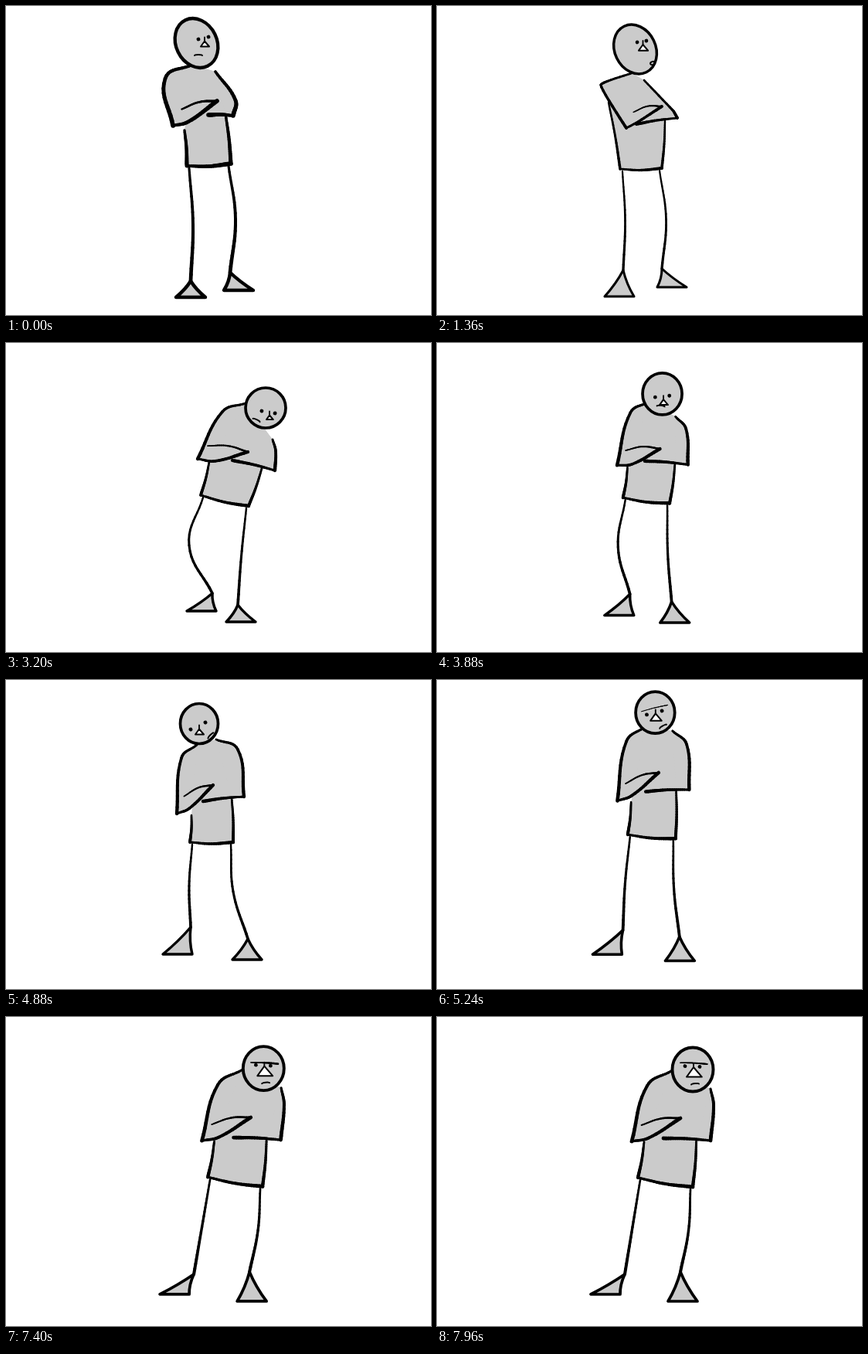
Animation, 550 px wide and 400 px high, one loop 8 s. Source, as an HTML page with a canvas:

```html
<!DOCTYPE html>
<html lang="en">
<head>
<meta charset="utf-8">
<title>Waiting figure</title>
<style>
  html, body { margin: 0; width: 100%; height: 100%; overflow: hidden; background: #fff; }
  canvas { display: block; }
</style>
</head>
<body>
<canvas id="stage" width="550" height="400"></canvas>
<script>
const ctx = document.getElementById('stage').getContext('2d');
const LOOP = 8000, GREY = '#cbcbcb', INK = '#000', SHOE = 38;

// A pose is a handful of joints (x, y pairs) plus these settings:
// skull: radii, tilt   look: tilt, eye distance, nose size, lid   lips: turn, openness
// shoe: slant, height, knee bend   pen: line weight, softness of corners
const SETTINGS = new Set(['skull', 'look', 'lips', 'shoeL', 'shoeR', 'pen']);

const folded = {
  head: [246.5, 48], skull: [26.5, 33, -.45], face: [255.5, 41.5], look: [-.23, 6.7, 1, 0],
  mouth: [249, 64], lips: [0, 0],
  armL: [241, 76, 206, 94, 216, 155, 273, 123], armR: [271, 85, 297, 122, 294, 142, 262, 141],
  waist: [231, 161], hips: [234, 207, 291, 204],
  ankleL: [239, 356], shoeL: [0, 21, 4], ankleR: [290, 345], shoeR: [11, 23, 8], pen: [5.2, 1]
};
const whistling = {
  head: [256.5, 56], skull: [26.5, 33, -.45], face: [265, 46], look: [-.16, 6, 1.1, 0],
  mouth: [279, 74], lips: [-.4, 1],
  armL: [252, 87, 212, 102, 245, 158, 291, 130], armR: [268, 96, 306, 136, 311, 145, 258, 153],
  waist: [222, 125], hips: [237, 211, 291, 210],
  ankleL: [241, 342], shoeL: [-5, 34, 3], ankleR: [291, 340], shoeR: [13, 24, 7], pen: [3.6, .2]
};
const sulking = {
  head: [308.5, 71], skull: [26.5, 30, 0], face: [306, 72], look: [.06, 8, 1.2, 0],
  mouth: [293, 87], lips: [1, 0],
  armL: [279, 77, 259, 88, 241, 156, 297, 144], armR: [326, 98, 330, 120, 328, 167, 268, 157],
  waist: [244, 158], hips: [237, 197, 301, 206],
  ankleL: [245, 335], shoeL: [-9, 22, -12], ankleR: [294, 330], shoeR: [12, 34, 5], pen: [4.3, 1]
};
const stooped = {
  head: [336, 84], skull: [26, 26, 0], face: [339.5, 89.5], look: [.17, 8.7, .8, 0],
  mouth: [324, 100], lips: [.45, 0],
  armL: [310, 78, 280, 89, 248, 150, 313, 141], armR: [345, 125, 349, 140, 348, 165, 293, 152],
  waist: [263, 154], hips: [252, 197, 314, 211],
  ankleL: [267, 324], shoeL: [-14, 23, -24], ankleR: [300, 339], shoeR: [4, 22, -1], pen: [4, 1]
};
const tilted = {
  head: [250, 56.5], skull: [24.5, 26, 0], face: [248.5, 59.5], look: [-.44, 10.5, 1, 0],
  mouth: [265, 72], lips: [-.8, 0],
  armL: [247, 84, 227, 101, 221, 173, 268, 136], armR: [272, 77, 300, 90, 308, 151, 255, 157],
  waist: [240, 175], hips: [238, 210, 294, 210],
  ankleL: [239, 320], shoeL: [-17, 35, -3], ankleR: [313, 335], shoeR: [-1, 27, -8], pen: [4, 1]
};
const stern = {
  head: [331, 68], skull: [26.5, 28.5, 0], face: [330.5, 64], look: [.05, 9.5, 1.8, 3],
  mouth: [334, 87], lips: [-.1, 0],
  armL: [303, 70, 272, 89, 252, 161, 315, 131], armR: [354, 93, 358, 115, 354, 160, 293, 157],
  waist: [268, 162], hips: [260, 208, 331, 220],
  ankleL: [243, 333], shoeL: [-25, 26, 0], ankleR: [315, 330], shoeR: [3, 38, 4], pen: [4.4, 1]
};
const staring = { ...stern, look: [.05, 9.5, 1.8, 2] };

const mapParts = (pose, change) => Object.fromEntries(
  Object.entries(pose).map(([name, part]) => [name, change(part, name)]));

const mix = (a, b, k) => mapParts(a, (part, name) => part.map((v, i) => v + (b[name][i] - v) * k));

// Shifts the figure by an amount that grows from the feet to the head.
const lean = (pose, dx, dy) => mapParts(pose, (part, name) =>
  SETTINGS.has(name) ? part : part.map((v, i) =>
    v + (i % 2 ? dy : dx) * Math.max(0, (345 - part[i | 1]) / 300)));

const tall = lean(mix(folded, whistling, .6), -2, -8);
const sinking = lean(mix(whistling, sulking, .5), -4, 5);
const stretched = { ...lean(stooped, 34, -10), ankleL: [212, 326], shoeL: [-14, 24, -12] };
const recovering = lean(stooped, -18, -4);
const upright = lean(mix(sulking, tilted, .6), 4, -4);
const backward = lean(tilted, -8, -10);
const raised = lean(mix(tilted, stern, .4), 0, -20);
const swayed = lean(staring, 5, -3);

const timeline = [[0, folded]];
function tween(from, to, start, end, steps) {
  for (let i = 0; i < steps; i++) {
    const time = start + (end - start) * i / Math.max(1, steps - 1);
    timeline.push([time, mix(from, to, (i + 1) / steps)]);
  }
}

tween(folded, tall, 800, 880, 2);
tween(tall, whistling, 1360, 1360, 1);
tween(whistling, sinking, 1400, 1640, 5);
tween(sinking, sulking, 2120, 2320, 3);
tween(sulking, stretched, 2440, 2640, 3);
tween(stretched, stooped, 3040, 3200, 3);
tween(stooped, recovering, 3320, 3320, 1);
tween(recovering, upright, 3640, 4000, 6);
tween(upright, tilted, 4640, 4880, 4);
tween(tilted, backward, 4920, 5000, 2);
tween(backward, raised, 5160, 5240, 2);
tween(raised, stern, 5600, 5800, 3);
tween(stern, swayed, 7320, 7560, 4);
tween(swayed, staring, 7640, 7960, 5);

const pairs = part => part.flatMap((v, i) => i % 2 ? [] : [[v, part[i + 1]]]);
const shift = ([x, y], dx, dy) => [x + dx, y + dy];
const between = (a, b, k) => [a[0] + (b[0] - a[0]) * k, a[1] + (b[1] - a[1]) * k];
const bow = (a, b, dx, dy, k = .5) => [a, shift(between(a, b, k), dx, dy), b];

// Samples a curve through the points; softness 0 gives straight lines.
function curve(p, soft = 1) {
  const last = p.length - 1, out = [p[0]];
  const direction = i => {
    const a = p[Math.max(0, i - 1)], b = p[Math.min(last, i + 1)];
    const size = Math.hypot(b[0] - a[0], b[1] - a[1]) || 1;
    return [(b[0] - a[0]) / size, (b[1] - a[1]) / size];
  };
  for (let i = 0; i < last; i++) {
    const a = p[i], b = p[i + 1], da = direction(i), db = direction(i + 1);
    const reach = soft * Math.hypot(b[0] - a[0], b[1] - a[1]) * .4;
    const c = shift(a, da[0] * reach, da[1] * reach), d = shift(b, -db[0] * reach, -db[1] * reach);
    for (let s = 1; s <= 10; s++) {
      const t = s / 10, middle = between(c, d, t);
      out.push(between(between(between(a, c, t), middle, t),
        between(middle, between(d, b, t), t), t));
    }
  }
  return out;
}

// Draws a line that swells towards its end, like a brush pen.
function brush(line, weight) {
  for (let i = 1; i < line.length; i++) {
    ctx.lineWidth = weight * (.7 + .4 * i / line.length);
    ctx.beginPath();
    ctx.moveTo(...line[i - 1]);
    ctx.lineTo(...line[i]);
    ctx.stroke();
  }
}

function area(list, color) {
  ctx.beginPath();
  list.forEach(p => ctx.lineTo(...p));
  ctx.closePath();
  ctx.fillStyle = color;
  ctx.fill();
}

function drawBody({ armL, armR, waist, hips, pen: [weight, soft] }) {
  const [neck, shoulder, elbow, hand] = pairs(armL);
  const [collar, outer, elbowR, cuff] = pairs(armR);
  const [hipL, hipR] = pairs(hips);
  const upperL = curve([neck, shoulder, elbow], soft);
  const upperR = curve([collar, outer, elbowR], soft);
  const foreL = curve(bow(elbow, hand, 0, 6 * soft, .35), soft);
  const foreR = curve(bow(elbowR, cuff, 0, -1));
  const fingers = shift(between(hand, elbow, .8), 0, -15);
  const sideL = curve(bow(waist, hipL, 1, 0));
  const hem = curve(bow(hipL, hipR, 0, 2));
  const sideR = curve(bow(between(elbowR, cuff, .3), hipR, 1, 0));

  area([...upperL, ...foreL, cuff, ...upperR.toReversed()], GREY);
  area([neck, ...sideL, ...hem, ...sideR.toReversed(), collar], GREY);
  for (const line of [upperL, foreL, upperR, foreR, hem]) brush(line, weight);
  for (const line of [sideL, sideR]) brush(line, weight * .9);
  brush(curve(bow(fingers, hand, 0, -4)), weight * .6);
}

function drawLeg(hip, ankle, [slant, height, bend], weight) {
  brush(curve(bow(shift(hip, 0, 3), ankle, bend, 0)), weight * .85);
  const left = shift(ankle, slant - SHOE / 2, height), right = shift(left, SHOE, 0);
  const inside = between(ankle, between(left, right, .5), .55);
  const waistOf = corner => between(between(ankle, corner, .5), inside, .3);
  ctx.beginPath();
  ctx.moveTo(...ankle);
  ctx.quadraticCurveTo(...waistOf(left), ...left);
  ctx.lineTo(...right);
  ctx.quadraticCurveTo(...waistOf(right), ...ankle);
  ctx.fillStyle = GREY;
  ctx.fill();
  ctx.lineWidth = weight * .85;
  ctx.stroke();
}

function drawHead({ head, skull, face, look: [tilt, gap, nose, lid], mouth, lips: [turn, open], pen }) {
  ctx.beginPath();
  ctx.ellipse(...head, ...skull, 0, Math.PI * 2);
  ctx.fillStyle = GREY;
  ctx.fill();
  ctx.lineWidth = pen[0] * .5 + 1.7;
  ctx.stroke();

  const tip = shift(face, 1.5, nose > 1.3 ? 1 : 4);
  area([tip, shift(tip, 6 * nose, 7 * nose), shift(tip, -5 * nose, 7 * nose)], '#fff');
  ctx.lineWidth = 2;
  ctx.stroke();
  brush([shift(tip, 0, -5), tip], 2);

  ctx.save();
  ctx.translate(...face);
  ctx.rotate(tilt);
  ctx.fillStyle = INK;
  for (const side of [-gap, gap]) {
    ctx.beginPath();
    ctx.arc(side, 0, 2.4, 0, Math.PI * 2);
    ctx.fill();
  }
  if (lid > .3) brush(curve(bow([-16, lid * 2 - 8], [19, lid * 2 - 8], 0, -.5)), lid);
  ctx.restore();

  ctx.beginPath();
  ctx.ellipse(...mouth, 5 - 2 * open, 1 + open, turn, Math.PI, Math.PI * (2 + open));
  ctx.lineWidth = 2;
  ctx.stroke();
}

function render(now) {
  const time = now % LOOP;
  const pose = timeline.findLast(([start]) => start <= time)[1];
  const [hipL, hipR] = pairs(pose.hips);
  ctx.fillStyle = '#fff';
  ctx.fillRect(0, 0, 550, 400);
  ctx.strokeStyle = INK;
  ctx.lineCap = ctx.lineJoin = 'round';
  drawLeg(shift(hipL, 3, 0), pose.ankleL, pose.shoeL, pose.pen[0]);
  drawLeg(shift(hipR, -3, 0), pose.ankleR, pose.shoeR, pose.pen[0]);
  drawBody(pose);
  drawHead(pose);
}

const began = performance.now();
function tick() {
  render(performance.now() - began);
  requestAnimationFrame(tick);
}
tick();
</script>
</body>
</html>
```
